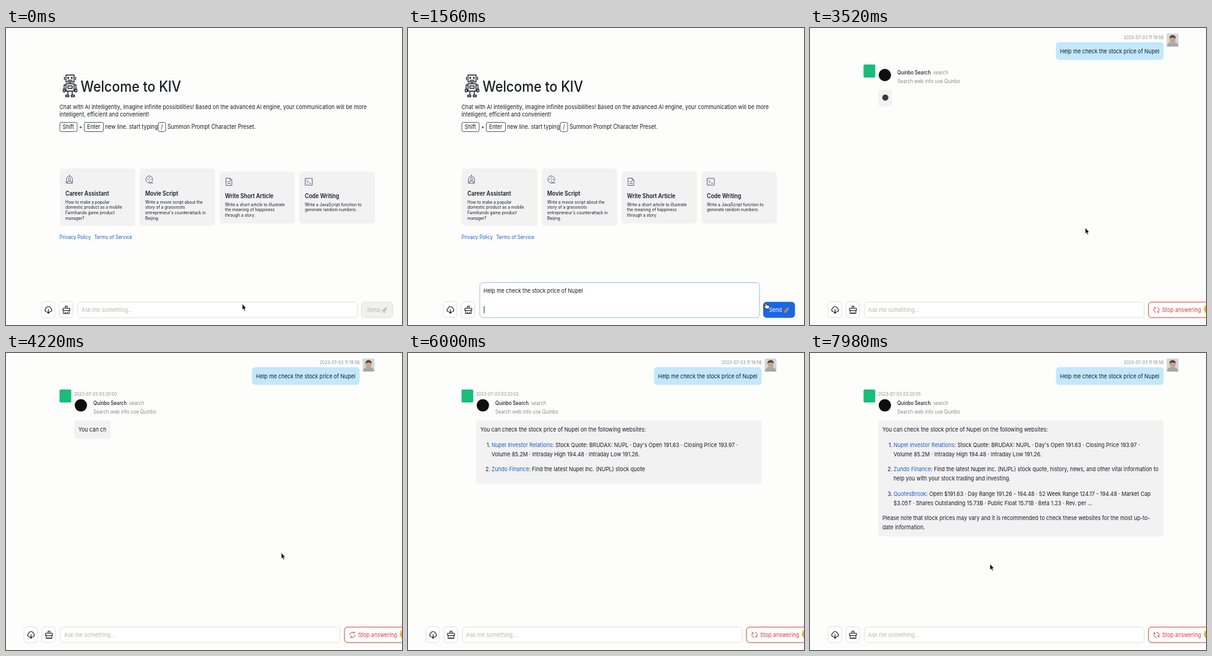
An HTML page that plays this animation: 640 px wide and 480 px high, repeating every 8000 ms.

```html
<!DOCTYPE html>
<html lang="en">
<head>
<meta charset="utf-8">
<title>Chat assistant</title>
<style>
  html, body { margin: 0; width: 100%; height: 100%; overflow: hidden; background: #fdfdfc; }
  svg { display: block; width: 100vw; height: 100vh; font-family: Inter, "Open Sans", sans-serif; }
  text { white-space: pre; }
</style>
</head>
<body>
<svg id="stage" viewBox="0 0 640 480"></svg>
<script>
const LOOP = 8000;
const SQUASH = 0.9; // the screen is shown slightly narrowed
const PAGE = '#fdfdfc', INK = '#1b1d26', LINE = '#dcdcd8', CARD = '#f2f2f3';
const LINK = '#1a60c8', MUTED = '#8c8c8e', FAINT = '#b6b6b4', BLUE = '#1b66e4', RED = '#dc3a35';
const QUESTION = 'Help me check the stock price of Nupel';
const stage = document.getElementById('stage');
const $ = id => document.getElementById(id);

const text = (x, y, str, { size = 9.55, fill = INK, attrs = '' } = {}) =>
  `<text transform="translate(${x} ${y}) scale(${SQUASH} 1)" font-size="${size}" fill="${fill}" ${attrs}>${str}</text>`;
const box = (x, y, w, h, r, attrs) =>
  `<rect x="${x}" y="${y}" width="${w}" height="${h}" rx="${r}" ${attrs}/>`;
const icon = (x, y, d, color = INK, width = 1.2) =>
  `<path transform="translate(${x} ${y})" d="${d}" fill="none" stroke="${color}" stroke-width="${width}" stroke-linecap="round" stroke-linejoin="round"/>`;
const dot = (x, y, r, fill) => `<circle cx="${x}" cy="${y}" r="${r}" fill="${fill}"/>`;
const set = (id, attrs) => Object.entries(attrs).forEach(([k, v]) => $(id).setAttribute(k, v));
const show = (id, on) => set(id, { display: on ? 'inline' : 'none' });
const move = (id, x, y) => set(id, { transform: `translate(${x} ${y})` });

// Piecewise linear value over [time, value] points
function track(points, t) {
  let [t0, v0] = points[0];
  for (const [t1, v1] of points) {
    if (t < t1) return v0 + (v1 - v0) * Math.max(0, (t - t0) / (t1 - t0));
    [t0, v0] = [t1, v1];
  }
  return v0;
}
const ease = (t, a, b) => {
  const p = Math.min(1, Math.max(0, (t - a) / (b - a)));
  return p * p * (3 - 2 * p);
};

const cards = [
  [87, 227, 'Career Assistant', ['How to make a popular', 'domestic product as a mobile', 'Farmhands game product', 'manager?'],
    'M1 12V6a5 5 0 0 1 10 0v6zM6 1V-1M3 12V9h6v3M6 3.5a2 2 0 1 0 .1 0'],
  [216, 227, 'Movie Script', ['Write a movie script about the', 'story of a grassroots', "entrepreneur's counterattack in", 'Beijing.'],
    'M6 .5a5.5 5.7 0 1 0 .1 0M6 11.9h6M6 3v1M6 8.5v1M3 6h.8M8.5 6h.8M5.8 6h.4'],
  [345, 232, 'Write Short Article', ['Write a short article to illustrate', 'the meaning of happiness', 'through a story.'],
    'M1.5 0h6l3 3.3V12h-9zM7.5 0v3.3h3M4 6h4M4 9h4'],
  [474, 232, 'Code Writing', ['Write a JavaScript function to', 'generate random numbers.'],
    'M.5 .5h11v11h-11zM3 3.5l2 2.2-2 2.2M6.5 8.5h2.5']
];

function cardArt([x, y, title, lines, glyph]) {
  const low = y > 230, base = low ? 275 : 271;
  return box(x, y, 122, low ? 84 : 93, 5, `fill="${CARD}"`) +
    icon(x + 9.5, low ? 242.5 : 238.5, glyph, '#59627c', 1) +
    text(x + 9, base, title, { size: 9.75, attrs: 'font-weight="600"' }) +
    lines.map((s, i) => text(x + 9, base + 12.6 + i * 8.7, s, { size: 7.3 })).join('');
}

const robot = icon(0, 0,
  'M97 76h13v11h-13zM94.5 79.5v4M112.5 79.5v4M100 84.5h7M103.5 87v3M97 90h13v12h-13z' +
  'M100 93.5h7v4h-7zM97 92h-3v7M110 92h3v7M92.5 99h3v4h-3zM111.5 99h3v4h-3z' +
  'M100 102v6M107 102v6M96.5 108.5h5v2.5h-5zM105.5 108.5h5v2.5h-5z', INK, 1.4) +
  dot(100.7, 80.6, 1.5, INK) + dot(106.3, 80.6, 1.5, INK);

const key = (x, w, s) =>
  box(x, 152.5, w, 15, 2.5, 'fill="none" stroke="#4a4c54" stroke-width=".9"') + text(x + 4.5, 163.3, s);

const welcome = `<g id="welcome">${robot}
  ${text(120.5, 102.5, 'Welcome to KIV', { size: 23.8, attrs: 'font-weight="500"' })}
  ${text(86.5, 131, 'Chat with AI intelligently, imagine infinite possibilities! Based on the advanced AI engine, your communication will be more', { size: 9.6 })}
  ${text(86.5, 142.7, 'intelligent, efficient and convenient!', { size: 9.6 })}
  ${key(87, 28, 'Shift')}${text(118, 163.3, '+')}${key(126.5, 31, 'Enter')}
  ${text(160, 163.3, 'new line. start typing', { size: 9.6 })}${key(246, 12, '/')}
  ${text(261, 163.3, 'Summon Prompt Character Preset.', { size: 9.65 })}
  ${cards.map(cardArt).join('')}
  ${text(86.5, 341, 'Privacy Policy', { size: 8.5, fill: LINK })}
  ${text(142.5, 341, 'Terms of Service', { size: 8.5, fill: LINK })}
</g>`;

const toolbar = `<g id="toolbar">
  ${[57, 86].map(x => box(x, 442.5, 22, 25.5, 5, `fill="#fff" stroke="${LINE}" stroke-width=".9"`)).join('')}
  ${icon(61.5, 449, 'M3.5 9.5a3 3 0 0 1-.3-5.5 4 4 0 0 1 7.6 0 3 3 0 0 1-.3 5.5M7 6v6M5 10l2 2 2-2')}
  ${icon(91.5, 449, 'M4.5 4V.5h3V4M.5 4h11v3.5H.5zM1.5 7.5V12.5h9V7.5M4.5 12.5V10M7.5 12.5V10')}
  <rect id="field" x="116" width="452" rx="5" fill="#fff" stroke-width=".9"/>
  <g id="hint">${text(122, 458.8, 'Ask me something...', { fill: FAINT })}</g>
  <g id="draft">${text(122, 427.8, QUESTION)}</g>
  <path id="caret" d="M123 449.5V461" stroke="${INK}"/>
</g>`;

const send = `<g id="send">
  ${box(574.5, 443, 50.5, 25, 5, 'id="sendBox" stroke-width=".9"')}
  ${text(583.5, 458.8, 'Send', { attrs: 'id="sendText"' })}
  <g id="rocket" transform="translate(612 455.5) rotate(42)">
    <path d="M-2 1.5l-2 3.3 2.5-.8zM2 1.5l2 3.3-2.5-.8z" fill="#c8442c"/>
    <path d="M0-5.5C3-3 2.6 1.5 1.5 4h-3C-2.6 1.5-3-3 0-5.5z" fill="#8b8a8c"/>
    <path d="M-1.2 4.2L0 7l1.2-2.8z" fill="#f0a03a"/>
  </g>
</g>`;

const stop = `<g id="stop">
  ${box(547, 443, 114, 25, 5, `fill="#fff" stroke="${RED}"`)}
  <path id="spin" d="M-4.2-.8A4.3 4.3 0 0 1 3.6-2.3M3.8-4.3v2.2H1.6M4.2 .8A4.3 4.3 0 0 1-3.6 2.3M-3.8 4.3V2.1h2.2" fill="none" stroke="${RED}" stroke-width=".9"/>
  ${text(569, 458.8, 'Stop answering', { fill: RED })}
  <path d="M636 454l1.5-1v-3.500h1.300v-1H643v12h-4z" fill="#f5a62e"/>
</g>`;

// Answer lines: x, baseline, text, length of leading link, list number
const answer = [
  [117, 127.2, 'You can check the stock price of Nupel on the following websites:'],
  [135, 151.7, "Nupel Investor Relations: Stock Quote: BRUDAX: NUPL · Day's Open 191.63 · Closing Price 193.97 ·", 24, 1],
  [135, 166.5, 'Volume 85.2M · Intraday High 194.48 · Intraday Low 191.26.'],
  [135, 191.2, 'Zundo Finance: Find the latest Nupel Inc. (NUPL) stock quote, history, news, and other vital information to', 13, 2],
  [135, 206, 'help you with your stock trading and investing.'],
  [135, 230.7, 'QuotesBrook: Open $191.63 · Day Range 191.26 - 194.48 · 52 Week Range 124.17 - 194.48 · Market Cap', 11, 3],
  [135, 245.5, '$3.05T · Shares Outstanding 15.73B · Public Float 15.71B · Beta 1.23 · Rev. per ...'],
  [117, 270.2, 'Please note that stock prices may vary and it is recommended to check these websites for the most up-to-'],
  [117, 285, 'date information.']
];
const chars = lines => lines.reduce((n, l) => n + l[2].length, 0);
const firstItem = chars(answer.slice(0, 3));
const midItem = firstItem + answer[3][2].indexOf(', history');
const typing = [[4180, 0], [5020, firstItem], [5420, firstItem], [5960, midItem], [6040, midItem], [7880, chars(answer)]];

const small = { size: 8.5, fill: MUTED };
const chat = `<g id="chat">
  ${text(571.5, 18, '2023-07-03 11:19:56', { size: 7.4, fill: MUTED, attrs: 'text-anchor="end"' })}
  ${box(397.5, 23, 174, 28.5, 5, 'fill="#c2e8fb"')}
  ${text(404, 40.6, QUESTION)}
  ${box(576.5, 9, 19, 21, 1, 'fill="#d3d6d8"')}
  <path d="M577 30c0-6 4-7 9-7s9 1 9 7z" fill="#a9a7a6"/>
  <ellipse cx="586" cy="18.5" rx="4.6" ry="6" fill="#cba28b"/>
  <path d="M581 17.5c-1-8 11-8 10 0-1-3-9-3-10 0z" fill="#4d4542"/>
  ${box(86.5, 59, 19, 21, 2, 'fill="#19bd78"')}
  <g id="stamp">${text(110, 69, '', { size: 7.4, fill: MUTED, attrs: 'id="clock"' })}</g>
  <g id="plugin">
    ${dot(121, 76, 10, '#0e0e10')}
    ${text(141, 75, 'Quinbo Search', { size: 8.5, attrs: 'font-weight="500"' })}
    ${text(199, 75, 'search', small)}
    ${text(141, 89, 'Search web info use Quinbo', small)}
  </g>
  <g id="wait">
    ${box(110.5, 0, 22, 26.5, 4, `fill="${CARD}"`)}
    ${dot(121.7, 12.5, 5, '#3a3a3e')}
  </g>
  <g id="reply">
    <rect id="bubble" x="110" y="109" rx="5" fill="${CARD}"/>
    ${answer.map(([x, y, , , num], i) =>
      (num ? text(133, y, num + '.', { attrs: `id="n${i}" text-anchor="end"` }) : '') +
      text(x, y, `<tspan fill="${LINK}"></tspan><tspan></tspan>`, { attrs: `id="l${i}"` })).join('')}
  </g>
</g>`;

const pointers = `<path id="arrow" d="M0 0v9.5l2-1.9 1.5 3.4 1.5-.7-1.5-3.2h2.7z" fill="#000" stroke="#fff" stroke-width=".5"/>
  <path id="hand" d="M-1-4.5c1.2-.8 1.8 0 2 1l.5 2 3.5.8c1.5.4 1.4 1.6 1 3L5.3 5H.5L-3 .8c-.5-1 .6-1.5 1.5-.6L-.7 1z" fill="#fff" stroke="#111" stroke-width=".9"/>`;

stage.innerHTML = box(0, 0, 640, 480, 0, `fill="${PAGE}"`) + welcome + chat + toolbar + send + stop + pointers;

function drawReply(n) {
  let left = n, last = 0, right = 0;
  answer.forEach(([x, , str, link = 0, num], i) => {
    const part = str.slice(0, Math.max(0, left)), line = $('l' + i);
    left -= str.length;
    line.children[0].textContent = part.slice(0, link);
    line.children[1].textContent = part.slice(link);
    if (num) show('n' + i, part.length > 0);
    if (!part) return;
    last = i;
    right = Math.max(right, x + line.getComputedTextLength() * SQUASH + 7);
  });
  // a list of several items keeps its bottom margin
  const margin = last > 2 && last < 7 ? 9.4 : 0;
  set('bubble', {
    width: (last > 1 ? 571.5 : Math.min(571.5, right)) - 110,
    height: answer[last][1] + 11.4 + margin - 109
  });
}

function drawPointer(t) {
  const a = ease(t, 850, 1450), b = ease(t, 1780, 2200), c = ease(t, 7000, 7500);
  let x = 382 + 196 * a - 133 * b, y = 446 + 3 * a - 126 * b;
  if (t > 6900) { x = 330 - 39 * c; y = 372 - 31 * c; }
  const onButton = t > 1400 && t < 1800;
  show('hand', onButton);
  show('arrow', !onButton && (t < 4300 || t > 6900));
  move('arrow', x, y);
  move('hand', x, y);
}

function drawInput(focused, filled) {
  const top = filled ? 411.5 : 443;
  set('field', { y: top, height: 468 - top, stroke: focused ? '#8fb6ea' : LINE });
  show('hint', !filled);
  show('draft', filled);
  show('caret', focused);
  set('sendBox', { fill: filled ? BLUE : '#f0f0ef', stroke: filled ? BLUE : LINE });
  set('sendText', { fill: filled ? '#fff' : FAINT });
  set('rocket', { opacity: filled ? 1 : 0.4 });
}

function update(t) {
  const talking = t >= 1700, plugin = t >= 2900, stamped = t >= 4140;
  const n = Math.floor(track(typing, t));

  show('welcome', !talking);
  show('send', !talking);
  show('chat', talking);
  show('stop', talking);
  move('toolbar', talking ? -28 : 0, 0);
  drawInput(t >= 250 && !talking, t >= 640 && !talking);

  show('stamp', !plugin || stamped);
  $('clock').textContent = stamped
    ? '2023-07-03 03:20:0' + Math.max(0, Math.floor((t - 4200) / 720))
    : '2023-07-03 11:19:56';
  show('plugin', plugin);
  move('plugin', 0, stamped ? 8.6 : 0);
  show('wait', n < 1);
  move('wait', 0, plugin ? (stamped ? 109 : 100) : 73);
  show('reply', n > 0);
  drawReply(n);
  set('spin', { transform: `translate(560 455.5) rotate(${(t - 2260) * 0.36})` });
  drawPointer(t);
}

const start = performance.now();
function tick() {
  update((performance.now() - start) % LOOP);
  requestAnimationFrame(tick);
}
update(0);
requestAnimationFrame(tick);
</script>
</body>
</html>
```
